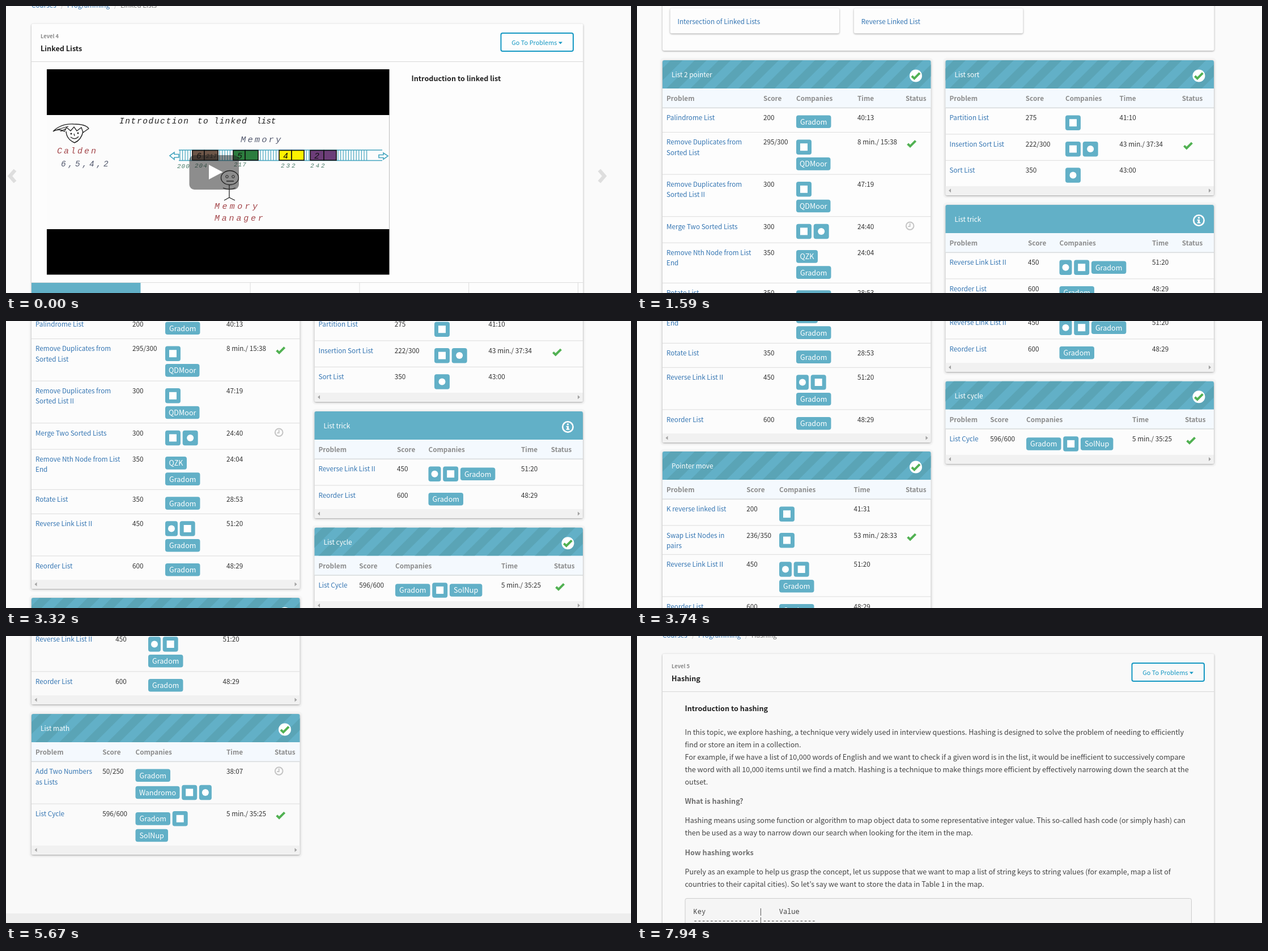
These frames come from a looping animation (1103x508 px, 8000 ms). An HTML page:

```html
<!DOCTYPE html>
<html lang="en">
<head>
<meta charset="utf-8">
<title>Course scroll</title>
<style>
html, body { margin: 0; width: 100%; height: 100%; overflow: hidden; }
svg { display: block; width: 1103px; height: 508px; background: var(--bg);
  font-family: "Noto Sans CJK JP", "Noto Sans CJK SC", "Noto Sans CJK", "Open Sans", sans-serif; }
.card { fill: var(--card); filter: drop-shadow(0 1px 1.5px rgba(0,0,0,.36)); }
.hand { font-family: "Liberation Mono", monospace; font-style: italic; }
.mono { font-family: "Noto Sans Mono", "DejaVu Sans Mono", monospace; white-space: pre; }
</style>
</head>
<body>
<svg id="stage" viewBox="0 0 1103 508"></svg>
<script>
const LOOP = 8000, LISTS = 580;
const TEAL = '#62b0c7', LINK = '#3576b3', INK = '#333', GREEN = '#51b152';

// Latin letters of this family are drawn 1.117 times larger than nominal
const text = (x, y, s, size = 13.1, fill = INK, extra = '') =>
  `<text x="${x}" y="${y}" font-size="${(size / 1.117).toFixed(2)}" fill="${fill}" ${extra}>${s}</text>`;
const bold = (x, y, s, size, fill) => text(x, y, s, size, fill, 'font-weight="700"');
const rect = (x, y, w, h, fill, extra = '') =>
  `<rect x="${x}" y="${y}" width="${w}" height="${h}" fill="${fill}" ${extra}/>`;
const card = (x, y, w, h) => rect(x, y, w, h, '', 'rx="3" class="card"').replace('fill=""', '');
const line = (d, stroke, width = 1, fill = 'none') =>
  `<path d="${d}" fill="${fill}" stroke="${stroke}" stroke-width="${width}"/>`;
const shape = (d, fill) => `<path d="${d}" fill="${fill}"/>`;
const circle = (x, y, r, fill, stroke = 'none', width = 0) =>
  `<circle cx="${x}" cy="${y}" r="${r}" fill="${fill}" stroke="${stroke}" stroke-width="${width}"/>`;
const at = (x, y, s) => `<g transform="translate(${x} ${y})">${s}</g>`;
const hand = (x, y, s, size, step, fill) =>
  `<text class="hand" x="${x}" y="${y}" font-size="${size}" letter-spacing="${(step - size * .6).toFixed(2)}" fill="${fill}">${s}</text>`;
const check = (x, y) => at(x, y, line('M-7 .5L-2.6 4.8L7 -4.8', GREEN, 4));

const badges = {
  done: circle(0, 0, 11, '#fff') + check(0, 0),
  info: circle(0, 0, 9.2, 'none', '#fff', 2.6) +
    shape('M-1.6 -6h3.2v2.8h-3.2zM-2.8 -1.7h4.4v5h1.4v2h-5.8v-2h1.2v-3h-1.2z', '#fff')
};

const tags = {
  A: [61.5, 'Gradom'], V: [60.5, 'QDMoor'], H: [38, 'QZK'], N: [57.5, 'SolNup'], Q: [78, 'Wandromo'],
  w: [27, 'square'], f: [22, 'dot'], g: [27, 'dot'], y: [27, 'dot']
};

function tag(key, x, y, mixed) {
  const [w, s] = tags[key], logo = key > 'Z';
  if (!logo) {
    y += mixed ? 2 : 0;
    return rect(x, y, w, 22.6, TEAL, 'rx="4"') +
      text(x + w / 2, y + 16.3, s, 14.1, '#fff', 'text-anchor="middle"');
  }
  const mark = s === 'dot' ? circle(x + w / 2, y + 13.2, 6, '#fff')
    : rect(x + w / 2 - 6.5, y + 6.7, 13, 13, '#fff');
  return rect(x, y, w, 26.5, TEAL, 'rx="4"') + mark;
}

// row: name lines; score; tag lines; time; status
function tableRow(spec, cols, top) {
  const [name, score, marks, time, status] = spec.split(';');
  const names = name.split('|');
  let out = '', y = top + 13;
  names.forEach((s, i) => out += text(cols[0], top + 21.8 + i * 18.3, s, 13.1, LINK));
  out += text(cols[1], top + 21.8, score) + text(cols[3], top + 21.8, time);
  for (const group of marks.split('|')) {
    const icons = /[a-z]/.test(group);
    let x = cols[2];
    for (const key of group) {
      out += tag(key, x, y, icons);
      x += tags[key][0] + 3.7;
    }
    y += icons ? 31.6 : 28.2;
  }
  if (status === 'ok') out += check(cols[4] + 10.7, top + 20);
  if (status === 'clock') out += at(cols[4] + 7.7, top + 16.5,
    circle(0, 0, 6.8, 'none', '#c4c4c4', 2) + line('M0 -4.5V1H-3.5', '#c4c4c4', 1.8));
  const height = 14.8 + Math.max(y - top - 13, names.length * 18.3);
  return [out, height];
}

function panel(x, y, title, badge, cols, rows) {
  const W = 473.5;
  cols = cols.map(c => c - x);
  let top = 84.5, body = '';
  rows.forEach((spec, i) => {
    const [s, h] = tableRow(spec, cols, top);
    if (i) body += rect(0, top - .5, W, 1, '#ddd');
    body += s;
    top += h;
  });
  const head = fill => shape('M0 50V3q0-3 3-3h467.5q3 0 3 3v47z', fill);
  let out = rect(-2, -2, W + 4, top + 20, 'none', 'rx="4" stroke="#000" stroke-opacity=".025" stroke-width="5"');
  out += card(0, 0, W, top + 15.2) + head(TEAL);
  if (badge === 'done') out += head('url(#stripes)');
  out += text(16, 30.3, title, 13.2, '#fff') + at(447, 27.5, badges[badge]);
  out += rect(0, 50, W, 34, '#f4f9fe') + rect(0, 83.5, W, 1.6, '#d9dcde');
  ['Problem', 'Score', 'Companies', 'Time', 'Status'].forEach((s, i) => out += bold(cols[i], 72.3, s, 13.1, '#8c8c8c'));
  out += body + rect(0, top - .8, W, 15.6, '#f1f1f1');
  out += shape(`M5.5 ${top + 7}l4 -3.5v7zM468.5 ${top + 7}l-4 -3.5v7z`, '#a3a3a3');
  return at(x, y, out);
}

function courseTop(level, title, height) {
  return text(45, 3, 'Courses', 13.1, LINK) + text(97, 3, '/', 13.1, '#bbb') +
    text(108, 3, 'Programming', 13.1, LINK) + text(191, 3, '/', 13.1, '#bbb') + text(202, 3, title, 13.1, '#777') +
    card(45, 31.5, 973.5, height) + rect(45, 98, 973.5, 1, '#d8d8d8') +
    bold(61, 57, 'Level ' + level, 10.5, '#888') + bold(61, 80, title, 14.1, '#222') +
    rect(873.5, 48, 127.5, 32, 'none', 'rx="3" stroke="#1598c3" stroke-width="2"') +
    text(892.3, 68.7, 'Go To Problems', 12.2, '#1598c3') + shape('M975 63.5h7l-3.5 4z', '#1598c3');
}

function memory() {
  const blue = '#45a5bf';
  let out = line('M305 255H664M305 273.5H664', blue, 1.5);
  for (const [a, b] of [[307, 327], [377, 400], [449, 481], [530, 537], [586, 638]])
    for (let x = a; x <= b; x += 4.6) out += line(`M${x} 255V273.5`, blue, 1.2);
  out += line('M289 265l8 -6v3.5h8v5.5h-8v3.5zM674 265.5l-8 -5.5v3.5h-8v5h8v3z', blue, 1.6, '#fff');
  const cells = [[329, 21, 24, '#6d5648', '6'], [401, 21, 23, '#2c7d3e', '5'],
    [482, 22, 22, '#fdf200', '4'], [537, 24, 22, '#6c3d78', '2']];
  for (const [x, a, b, fill, s] of cells) {
    const edge = 'stroke="#111" stroke-width="1.6"';
    out += rect(x, 255.5, a, 17.5, fill, edge) + rect(x + a, 255.5, b, 17.5, fill, edge) + hand(x + 7, 270, s, 15, 9, '#111');
  }
  out += hand(353, 269, '217', 10, 6.5, '#222');
  [[302, 200], [333, 204], [402, 217], [485, 232], [537, 242]].forEach(([x, n], i) =>
    out += hand(x, i && i !== 2 ? 286 : i ? 284 : 287, n, 11, i > 2 ? 9.5 : 7.6, '#4b7d6b'));
  return out;
}

function video() {
  const red = '#a4474b', ink = '#222';
  return rect(72, 112, 604.5, 363.5, '#000') + rect(72, 193, 604.5, 202, '#fcfcfc') +
    hand(200, 208, 'Introduction', 14.5, 10.3, ink) + hand(338, 208, 'to', 14.5, 10, ink) +
    hand(367, 208, 'linked', 14.5, 9.8, ink) + hand(442, 208, 'list', 14.5, 8.6, ink) +
    hand(414, 241, 'Memory', 15.5, 12.4, '#555b70') +
    line('M106 222q1 14 15 20q12 -5 15 -20', ink, 1.4) +
    line('M83 222q14 -14 36 -13q22 0 27 8q-6 4 -10 7l-3 -9l-8 6l-5 -7l-6 7l-7 -6l-4 7q-10 -6 -20 0zM90 219l20 -6M96 222l10 -5', ink, 1.3) +
    circle(115, 226, 1.5, ink) + circle(127, 225, 1.5, ink) + line('M114 232q8 6 14 -1M120 226l1 4', ink, 1.2) +
    hand(90, 261, 'Calden', 15, 12, red) + hand(97, 284, '6,5,4,2', 14.5, 12.5, '#555b70') +
    memory() +
    `<ellipse cx="395" cy="304" rx="15.5" ry="12.5" fill="none" stroke="${ink}" stroke-width="1.3"/>` +
    circle(390, 302, 2.3, 'none', ink, 1) + circle(401, 302, 2.3, 'none', ink, 1) +
    line('M389 310H402M394 317V339M383 322q11 5 22 0M394 339l-9 5M394 339l10 5', ink, 1.3) +
    hand(368, 359, 'Memory', 15, 13.4, red) + hand(368, 380, 'Manager', 15, 12.8, red) +
    rect(323.5, 264, 87.5, 61, '#212121', 'rx="9" opacity=".5"') + shape('M358 281l24.5 13l-24.5 13z', '#fff');
}

function listsPage() {
  let out = rect(0, LISTS + 1367, 1103, 300, '#ededed');
  out += line('M16 290.5L7 301L16 311.5M1047 290.5L1056 301L1047 311.5', '#dedede', 6.5);
  out += courseTop(4, 'Linked Lists', LISTS + 47.5) + bold(715.5, 133, 'Introduction to linked list', 14.1, '#222') + video();
  out += rect(45, 489, 973.5, 1, '#ddd') + rect(45, 490, 192.5, 50, TEAL) + rect(45, 540, 973.5, 1, '#ddd');
  for (let i = 2; i < 6; i++) out += rect(45 + i * 192.8, 489, 1, 51, '#ddd');
  let lists = '';
  [[58.5, 'Intersection of Linked Lists'], [382.8, 'Reverse Linked List']].forEach(([x, s]) =>
    lists += card(x, 4, 298.5, 44.5) + text(x + 13, 31.8, s, 13.1, LINK));
  const reverse = 'Reverse Link List II;450;', reorder = 'Reorder List;600;A;48:29;';
  lists += panel(45, 96, 'List 2 pointer', 'done', [52, 223, 281, 389, 474], [
    'Palindrome List;200;A;40:13;',
    'Remove Duplicates from|Sorted List;295/300;w|V;8 min./ 15:38;ok',
    'Remove Duplicates from|Sorted List II;300;w|V;47:19;',
    'Merge Two Sorted Lists;300;wy;24:40;clock',
    'Remove Nth Node from List|End;350;H|A;24:04;',
    'Rotate List;350;A;28:53;',
    reverse + 'fw|A;51:20;', reorder]);
  lists += panel(45, 682, 'Pointer move', 'done', [52, 193.3, 251, 382.5, 474], [
    'K reverse linked list;200;w;41:31;',
    'Swap List Nodes in|pairs;236/350;w;53 min./ 28:33;ok',
    reverse + 'fw|A;51:20;', reorder]);
  lists += panel(45, 1014, 'List math', 'done', [52, 170.3, 228.5, 389, 474], [
    'Add Two Numbers|as Lists;50/250;A|Qwf;38:07;clock',
    'List Cycle;596/600;Aw|N;5 min./ 35:25;ok']);
  lists += panel(544.5, 96, 'List sort', 'done', [551.5, 685.8, 756, 851.5, 961.8], [
    'Partition List;275;w;41:10;',
    'Insertion Sort List;222/300;wg;43 min./ 37:34;ok',
    'Sort List;350;g;43:00;']);
  lists += panel(544.5, 352, 'List trick', 'info', [551.5, 690, 745.5, 909, 961.8], [
    reverse + 'fwA;51:20;', reorder]);
  lists += panel(544.5, 557.7, 'List cycle', 'done', [551.5, 623.3, 687, 874, 967], [
    'List Cycle;596/600;AwN;5 min./ 35:25;ok']);
  return out + at(0, LISTS, lists);
}

function hashPage() {
  const para = (y, ...rows) => rows.map((s, i) => text(84.5, y + i * 22, s, 14.03, '#444')).join('');
  const mono = (y, s) => `<text class="mono" x="99.5" y="${y}" font-size="12" fill="#444">${s}</text>`;
  return courseTop(5, 'Hashing', 600) + bold(84.5, 133, 'Introduction to hashing', 14.1, '#222') +
    para(174.5,
      'In this topic, we explore hashing, a technique very widely used in interview questions. Hashing is designed to solve the problem of needing to efficiently',
      'find or store an item in a collection.',
      'For example, if we have a list of 10,000 words of English and we want to check if a given word is in the list, it would be inefficient to successively compare',
      'the word with all 10,000 items until we find a match. Hashing is a technique to make things more efficient by effectively narrowing down the search at the',
      'outset.') +
    bold(84.5, 297, 'What is hashing?', 14.1, '#707070') +
    para(331.3,
      'Hashing means using some function or algorithm to map object data to some representative integer value. This so-called hash code (or simply hash) can',
      'then be used as a way to narrow down our search when looking for the item in the map.') +
    bold(84.5, 388, 'How hashing works', 14.1, '#707070') +
    para(422.3,
      'Purely as an example to help us grasp the concept, let us suppose that we want to map a list of string keys to string values (for example, map a list of',
      'countries to their capital cities). So let’s say we want to store the data in Table 1 in the map.') +
    rect(85, 464.5, 893.5, 100, '#f5f5f5', 'rx="3" stroke="#ccc"') +
    mono(491.5, 'Key' + ' '.repeat(13) + '|    Value') + mono(508, '-'.repeat(16) + '|' + '-'.repeat(13));
}

const stage = document.getElementById('stage');
stage.innerHTML = `<defs><pattern id="stripes" width="30" height="30" patternUnits="userSpaceOnUse"
  patternTransform="translate(473.5 50) rotate(45)">${rect(0, 0, 15, 30, '#5aa4b6')}</pattern></defs>
  <g id="lists">${listsPage()}</g><g id="hash">${hashPage()}</g>
  <g id="cursor">${line('M.5 .5V13.5L3.6 10.7L5.6 15.5L7.8 14.6L5.8 9.9H10z', '#000', 1, '#fff')}</g>`;
const [lists, hash, cursor] = ['lists', 'hash', 'cursor'].map(id => document.getElementById(id));

// [time, scroll] in wheel bursts
const scroll = [[0, 0], [500, 14], [650, 115], [770, 235], [890, 330], [1320, 348], [1470, 490], [1590, 580],
  [1870, 598], [2020, 665], [2290, 682], [2420, 755], [3320, 772], [3470, 858], [3620, 950], [3740, 1031],
  [3860, 1094], [3980, 1130], [4570, 1146], [4720, 1225], [4840, 1262], [5400, 1290], [5550, 1402], [5670, 1456]];
// [time, x, y]
const pointer = [[0, -50, 0], [6670, 1075, 321], [6820, 1038, 418], [6950, 1049, 415], [7090, 1060, 21], [7220, -50, 0]];
const tones = [[0, '#fafafa', '#fdfdfd'], [3320, '#fbfbfb', '#fcfcfc'], [5400, '#f9f9f9', '#fafafa'], [7940, '#f8f8f8', '#f9f9f9']];
const current = (steps, t) => steps.filter(s => s[0] <= t).pop();

function draw(t) {
  const [, bg, face] = current(tones, t), [, x, y] = current(pointer, t);
  const next = t >= 7940;
  stage.style.setProperty('--bg', bg);
  stage.style.setProperty('--card', face);
  lists.setAttribute('transform', `translate(0 ${-current(scroll, t)[1]})`);
  lists.style.display = next ? 'none' : '';
  hash.style.display = next ? '' : 'none';
  cursor.setAttribute('transform', `translate(${x} ${y})`);
}

const start = performance.now();
function tick() {
  draw((performance.now() - start) % LOOP);
  requestAnimationFrame(tick);
}
draw(0);
requestAnimationFrame(tick);
</script>
</body>
</html>
```
